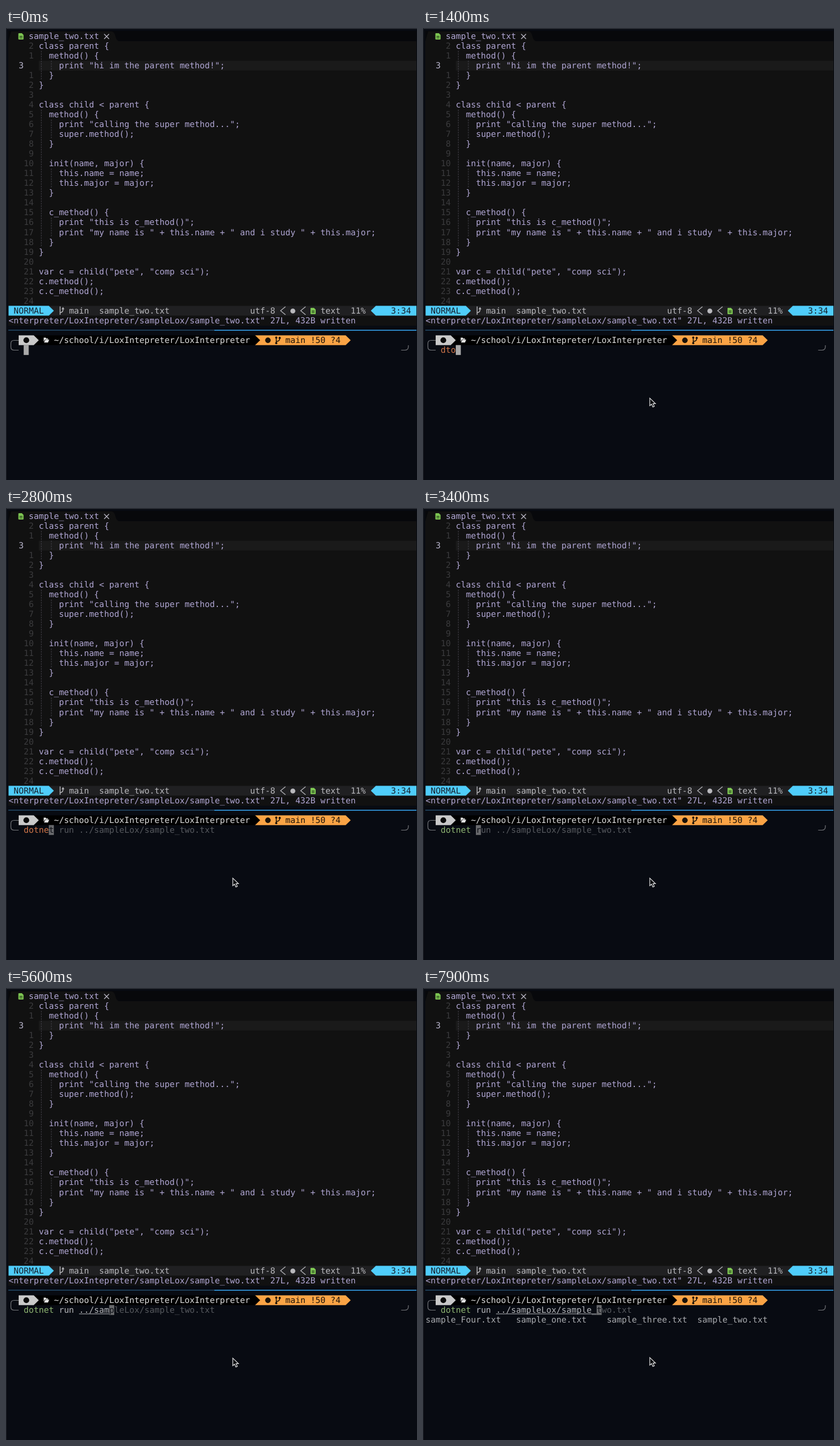
These frames come from a looping animation (714x785 px, 8 s). An HTML page:

```html
<!DOCTYPE html>
<html lang="en">
<head>
<meta charset="utf-8">
<title>Terminal session</title>
<style>
html, body { margin: 0; height: 100%; overflow: hidden; background: #080b12; }
svg { display: block; width: 100vw; height: 100vh; }
text {
  font: 14.52px "DejaVu Sans Mono", monospace;
  font-variant-ligatures: none;
  text-rendering: geometricPrecision;
}
</style>
</head>
<body>
<svg id="stage" viewBox="0 0 714 785"></svg>
<script>
const NS = 'http://www.w3.org/2000/svg';
const LILAC = '#b0a6d3', GREY = '#b9b9bd', CYAN = '#4fcdfb', GREEN = '#7cc452', ORANGE = '#fba445';
const stage = document.getElementById('stage');

// Character grid
const X = col => 4.5 + col * 8.74;
const Y = row => 5.7 + row * 17.03;

function add(parent, tag, attrs) {
  const el = document.createElementNS(NS, tag);
  for (const k in attrs) el.setAttribute(k, attrs[k]);
  parent.appendChild(el);
  return el;
}
const rect = (x, y, width, height, fill, parent = stage) => add(parent, 'rect', { x, y, width, height, fill });
const fillPath = (d, fill, parent = stage) => add(parent, 'path', { d, fill });
const line = (d, stroke, w = 1, more = {}) =>
  add(stage, 'path', { d, stroke, fill: 'none', 'stroke-width': w, ...more });
const dot = (cx, cy, r, fill) => add(stage, 'circle', { cx, cy, r, fill });
function text(row, col, str, fill, parent = stage) {
  const el = add(parent, 'text', { x: X(col), y: Y(row) + 13.2, fill });
  el.textContent = str;
}

// Powerline segment: square start, arrow tip one cell after the end column
function segment(row, from, to, fill) {
  const y = Y(row);
  fillPath(`M${X(from)} ${y}H${X(to)}l8.74 8.5l-8.74 8.5H${X(from)}z`, fill);
}
function fileIcon(x, y) {
  fillPath(`M${x + 1} ${y}h5l3 3v7q0 1-1 1h-7q-1 0-1-1v-9q0-1 1-1z`, GREEN);
  line(`M${x + 2} ${y + 5.5}h5m-5 2.5h5`, '#14220f', 1);
}

// Window edges and panes
rect(0, 0, 714, 1.5, '#30343b');
rect(0, 0, 1, 785, '#1d2128');
rect(4, 5, 709, 512, '#111111');
rect(4, 5, 709, 18, '#07080b');
fillPath('M4 23L9 6H183Q188 6 190 14T196 23z', '#111111');
fileIcon(21.5, 9);
text(0, 4, 'sample_two.txt', LILAC);
line('M170.5 10.5l8.5 8.5m0-8.5l-8.5 8.5', '#b9b7c4', 1.3);

// Editor
const code = `class parent {
  method() {
    print "hi im the parent method!";
  }
}

class child < parent {
  method() {
    print "calling the super method...";
    super.method();
  }

  init(name, major) {
    this.name = name;
    this.major = major;
  }

  c_method() {
    print "this is c_method()";
    print "my name is " + this.name + " and i study " + this.major;
  }
}

var c = child("pete", "comp sci");
c.method();
c.c_method();
`.split('\n');
const current = 2;
rect(X(6), Y(current + 1), 713 - X(6), 17, '#1a1a1a');
function guide(col, first, last) {
  line(`M${X(col) + 4.4} ${Y(first)}V${Y(last + 1)}`, '#45434c', 1, { 'stroke-dasharray': '2.6 1.66' });
}
guide(6, 2, 4);
guide(6, 8, 21);
[[3, 3], [9, 10], [14, 15], [19, 20]].forEach(([a, b]) => guide(8, a, b));
code.forEach((src, i) => {
  const row = i + 1;
  if (i === current) text(row, 2, '3', '#b9b5cc');
  else {
    const n = String(Math.abs(i - current));
    text(row, 5 - n.length, n, '#3b3b3d');
  }
  if (src) text(row, 6 + src.search(/\S/), src.trim(), LILAC);
});

// Status line
const S = 28, sy = Y(S);
rect(4, sy, 709, 17, '#202022');
segment(S, 0, 8, CYAN);
text(S, 1, 'NORMAL', '#14202a');
line(`M94 ${sy + 1}v14.5M94 ${sy + 12}q5-1 5-5V${sy + 4}`, GREY, 1.4);
fillPath(`M96.5 ${sy + 6}l2.5-4l2.5 4z`, GREY);
text(S, 12, 'main', GREY);
text(S, 18, 'sample_two.txt', GREY);
text(S, 48, 'utf-8', GREY);
for (const c of [54, 58]) line(`M${X(c) + 9} ${sy + 1.5}l-8.5 7l8.5 7`, GREY, 1.2);
dot(498.3, sy + 9, 4.3, GREY);
fileIcon(529, sy + 3.5);
text(S, 62, 'text', GREY);
text(S, 68, '11%', GREY);
fillPath(`M713 ${sy}H${X(73)}l-8.74 8.5l8.74 8.5H713z`, CYAN);
text(S, 76, '3:34', '#14202a');
text(29, 0, '<nterpreter/LoxIntepreter/sampleLox/sample_two.txt" 27L, 432B written', LILAC);

// Pane divider
rect(4, 524, 358, 1.5, '#234a68');
rect(362, 524, 351, 1.8, '#2f8fd0');

// Prompt
const P = 31, py = Y(P);
segment(P, 49, 67, ORANGE);
segment(P, 5, 49, '#000000');
segment(P, 2, 5, '#c9c9c9');
dot(35.3, py + 8.6, 5, '#0b0b0b');
fillPath(`M65.5 ${py + 4}h3.5l1 1.5h3v1.5h-5l-2.5 4z M68.5 ${py + 7.7}h6.5l-2 5h-7z`, '#e8e8e8');
text(P, 9, '~/school/i/LoxIntepreter/LoxInterpreter', '#dcdcdc');
dot(455, py + 8.7, 4.8, '#1b1208');
line(`M469.5 ${py + 4}v9.5m0-3q6 0 6-5v-1`, '#1b1208', 1.5);
for (const [x, y] of [[469.5, 4], [475.5, 4.5], [469.5, 13.5]]) dot(x, py + y, 1.9, '#1b1208');
text(P, 55, 'main !50 ?4', '#1b1208');
line('M22 542.5H14Q8.5 542.5 8.5 548V554Q8.5 559.5 14 559.5H22', '#74767a', 1.2);
line('M686.5 559.5H693Q699 559.5 699 553.5V551', '#74767a', 1.2);

// Command line
const full = 'dotnet run ../sampleLox/sample_two.txt';
const steps = [
  [0, ''], [800, 'd'], [1000, 'dt'], [1200, 'dto'], [1600, 'dt'], [1800, 'd'], [2000, 'do'], [2200, 'dot'],
  [2600, 'dotn'], [2800, 'dotne'], [3000, 'dotnet'], [3200, 'dotnet '],
  [3600, 'dotnet r'], [3700, 'dotnet ru'], [3800, 'dotnet run'], [4000, 'dotnet run '],
  [4200, 'dotnet run .'], [4300, 'dotnet run ..'], [4400, 'dotnet run ../']
];
[...'sampleL'].forEach((_, i) => steps.push([5000 + i * 230, full.slice(0, 15 + i)]));
steps.push([7100, full.slice(0, 24)], [7500, full.slice(0, 25)], [7800, full.slice(0, 31)]);

const input = add(stage, 'g', {});
const list = add(stage, 'g', {});
['sample_Four.txt', 'sample_one.txt', 'sample_three.txt', 'sample_two.txt']
  .forEach((name, i) => text(33, i * 18, name, '#a9abaf', list));

function drawInput(typed) {
  input.replaceChildren();
  const n = typed.length, end = 3 + n;
  const hint = n && full.startsWith(typed) ? full.slice(n) : '';
  text(32, 3, typed.slice(0, 6), n < 6 ? '#d0764a' : '#8fb573', input);
  if (n > 7) text(32, 10, typed.slice(7, 10), '#b4b6ba', input);
  if (n > 11) {
    text(32, 14, typed.slice(11), '#b4b6ba', input);
    rect(X(14), Y(32) + 14.8, X(end) - X(14), 1, '#b4b6ba', input);
  }
  rect(X(end), Y(32), 8.74, 17.2, hint ? '#68696c' : '#a9a9a9', input);
  if (hint) {
    text(32, end, hint[0], '#0d1016', input);
    const rest = hint.slice(1), gap = rest.search(/\S/);
    text(32, end + 1 + gap, rest.trim(), '#56595e', input);
  }
}

// Mouse pointers, hot spot at the origin
const arrow = add(stage, 'path', {
  d: 'M0 0V13.2L3.1 10.4L5.3 15.4L7.8 14.3L5.6 9.5H9.8z',
  fill: '#06080c', stroke: '#e4e4e4', 'stroke-width': 1.2
});
const beam = add(stage, 'g', { transform: 'translate(394 643)' });
for (const [stroke, w] of [['#d8d8d8', 3.4], ['#0b0d12', 1.2]])
  add(beam, 'path', {
    d: 'M-3-7Q0-7 0-5Q0-7 3-7M0-5V5M-3 7Q0 7 0 5Q0 7 3 7M-1.5 1.5H1.5',
    fill: 'none', stroke, 'stroke-width': w, 'stroke-linecap': 'round'
  });

const show = (el, on) => el.setAttribute('visibility', on ? 'visible' : 'hidden');
let shown = null;
function frame() {
  const t = performance.now() % 8000;
  const typed = steps.findLast(s => s[0] <= t)[1];
  if (typed !== shown) drawInput(shown = typed);
  show(list, t >= 7800);
  const text = t >= 6500 && t < 6900;
  show(beam, text);
  show(arrow, t >= 100 && !text);
  arrow.setAttribute('transform', `translate(394 ${t < 6500 ? 642.8 : 641.8})`);
  requestAnimationFrame(frame);
}
frame();
</script>
</body>
</html>
```
